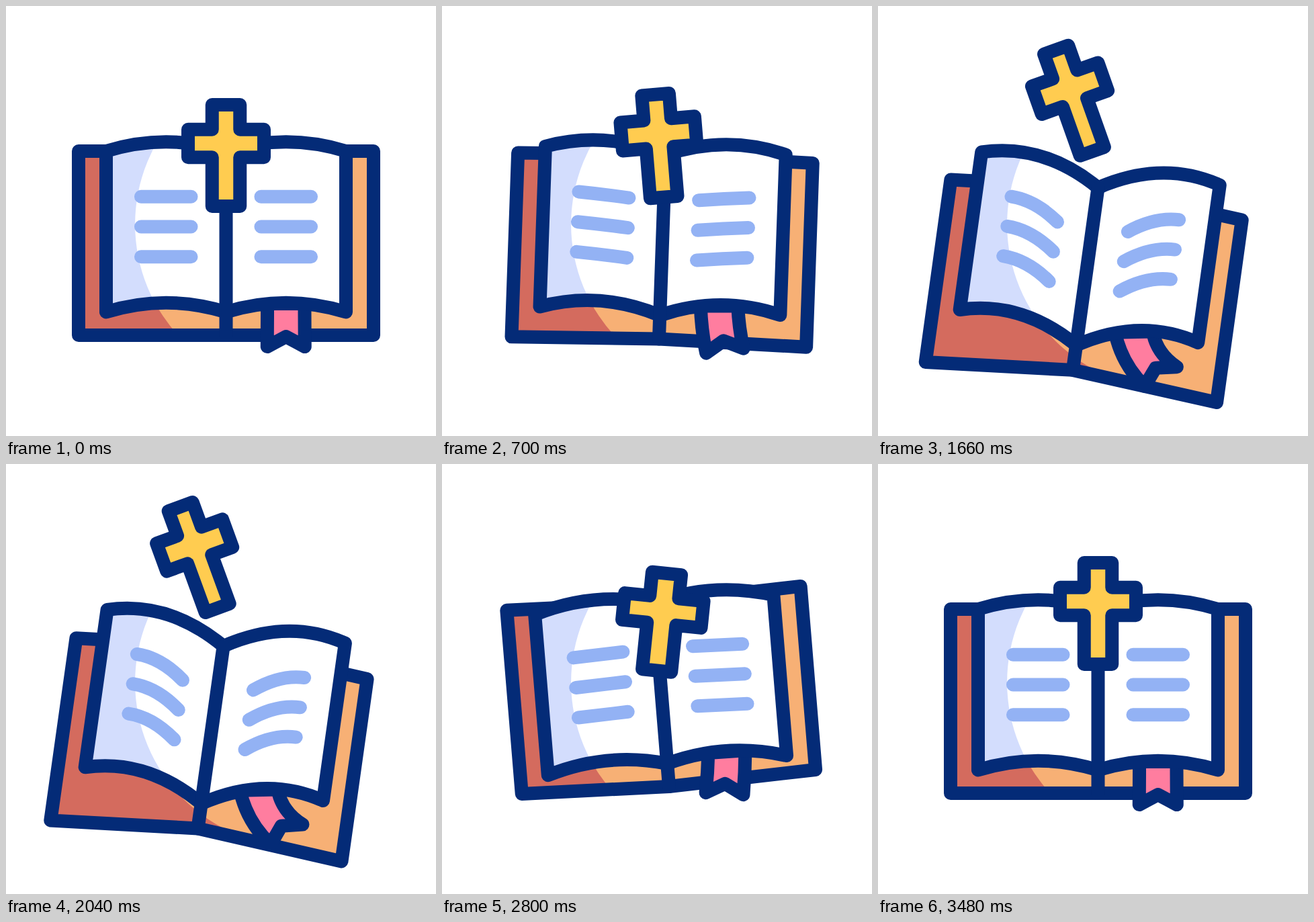
Animation of 640 by 640 pixels, one loop 3.6 s. Source, as an HTML page:

```html
<!DOCTYPE html>
<html lang="en">
<head>
<meta charset="utf-8">
<title>Open book</title>
<style>
html, body { margin: 0; width: 100%; height: 100%; overflow: hidden; background: #fff; }
svg { display: block; width: 100vw; height: 100vh; }
.ink { stroke: #042b77; stroke-width: 20; stroke-linejoin: round; stroke-linecap: round; }
</style>
</head>
<body>
<svg viewBox="0 0 640 640">
  <defs>
    <clipPath id="coverClip"><path class="cover"/></clipPath>
    <clipPath id="pageClip"><path class="pages"/></clipPath>
    <path id="lit" d="M437 80A245 245 0 0 0 437 570V640H700V0H437Z"/>
  </defs>
  <path class="cover" fill="#d46b5e"/>
  <use href="#lit" clip-path="url(#coverClip)" fill="#f7b075"/>
  <path class="cover ink" fill="none"/>
  <path class="ribbon ink" fill="#ff7d9f"/>
  <path class="pages" fill="#d3ddfd"/>
  <use href="#lit" clip-path="url(#pageClip)" fill="#fff"/>
  <path class="text" fill="none" stroke="#93b2f4" stroke-width="20" stroke-linecap="round"/>
  <path class="pages ink" fill="none"/>
  <path class="spine ink" fill="none"/>
  <path class="cross ink" fill="#ffcc50"/>
</svg>
<script>
const LOOP = 3600;
const REST = { x: 327.5, y: 490, tilt: 0, fold: 0, lift: 0 };

// Key moments: foot of the spine, tilt of the book, fold of the pages, lift of the cross.
// Every other measure follows from these.
const keys = [
  { t: 120, ...REST },
  { t: 460, x: 328.5, y: 489, tilt: -.6, fold: -.1, lift: -3 },
  { t: 700, x: 323, y: 495.5, tilt: 2, fold: 2.1, lift: 20 },
  { t: 1120, x: 296.5, y: 539, tilt: 7.4, fold: 7.9, lift: 123 },
  { t: 2040, x: 285.5, y: 542.5, tilt: 8, fold: 9.4, lift: 136 },
  { t: 2200, x: 281, y: 532, tilt: 6, fold: 8.1, lift: 110 },
  { t: 2400, x: 301, y: 509, tilt: 1.5, fold: 4.6, lift: 49.5 },
  { t: 2800, x: 338, y: 480, tilt: -4.7, fold: -.9, lift: -23.5 },
  { t: 3400, ...REST }
];

// Monotone cubic easing: smooth, with no overshoot between keys
const rate = (j, c) => (keys[j + 1][c] - keys[j][c]) / (keys[j + 1].t - keys[j].t);
function slope(j, c) {
  if (j === 0 || j === keys.length - 1) return 0;
  const a = rate(j - 1, c), b = rate(j, c);
  return a * b <= 0 ? 0 : 2 * a * b / (a + b);
}
function poseAt(t) {
  const j = keys.findIndex((k, i) => i && t < k.t) - 1;
  if (t < keys[0].t || j < 0) return REST;
  const p = keys[j], q = keys[j + 1], w = q.t - p.t;
  const u = (t - p.t) / w, u2 = u * u, u3 = u2 * u, pose = {};
  for (const c in REST) {
    pose[c] = p[c] + (q[c] - p[c]) * (3 * u2 - 2 * u3) +
      w * ((u3 - 2 * u2 + u) * slope(j, c) + (u3 - u2) * slope(j + 1, c));
  }
  return pose;
}

const along = deg => [Math.cos(deg * Math.PI / 180), Math.sin(deg * Math.PI / 180)];
const add = (p, q, k = 1) => [p[0] + q[0] * k, p[1] + q[1] * k];
const lerp = (p, q, k) => [p[0] + (q[0] - p[0]) * k, p[1] + (q[1] - p[1]) * k];
const mid = (p, q) => lerp(p, q, .5);
const at = p => p[0].toFixed(2) + ' ' + p[1].toFixed(2);
const M = p => 'M' + at(p), L = p => 'L' + at(p), Q = (c, p) => 'Q' + at(c) + ' ' + at(p);
const set = (name, d) =>
  document.querySelectorAll('.' + name).forEach(e => e.setAttribute('d', d));

function draw(t) {
  const { x, y, tilt, fold, lift } = poseAt(t);
  const foot = [x, y], up = along(tilt - 90), head = add(foot, up, 274);

  // Cover
  const spread = .35 * tilt + .22 * fold;
  const bl = add(foot, along(tilt - spread), -219.5), br = add(foot, along(tilt + spread), 219.5);
  set('cover', M(add(bl, up, 274)) + L(bl) + L(foot) + L(br) + L(add(br, up, 274)) + L(head) + 'Z');
  set('spine', M(head) + L(foot));

  // Pages
  const half = 178.5 + .3 * fold, bow = 27.5 + 1.4 * fold, gap = 34.5 + .3 * fold, tall = 274 - gap;
  const sb = add(foot, up, gap);
  const lb = add(sb, along(tilt + fold), -half), rb = add(sb, along(tilt - fold), half);
  const lt = add(lb, up, tall), rt = add(rb, up, tall);
  const arc = (p, q) => Q(add(mid(p, q), up, bow), q);
  set('pages', M(lb) + L(lt) + arc(lt, head) + arc(head, rt) + L(rb) + arc(rb, sb) + arc(sb, lb) + 'Z');

  // Lines of text, bending with the fold
  let d = '';
  for (const [edge, side] of [[lt, 1], [rt, -1]]) {
    const dir = along(tilt + side * 2.3 * fold), r = 37.3 + .2 * fold;
    for (let i = 0; i < 3; i++) {
      const c = add(mid(edge, head), up, .95 * fold - 67.8 - 44.7 * i);
      d += M(add(c, dir, -r)) + Q(add(c, up, .16 * fold * fold), add(c, dir, r));
    }
  }
  set('text', d);

  // Ribbon, hung from the right page and swaying as the pages fold
  const hang = k => add(add(lerp(sb, rb, k), up, 2 * k * (1 - k) * bow), [-.8 * fold, 0]);
  const a = hang(.345), e = hang(.655);
  const sway = 3.4 * fold, down = along(90 - sway), across = along(-sway);
  const tip = add(mid(a, e), down, 64 + 1.5 * fold);
  const left = add(tip, across, -28), right = add(tip, across, 28), notch = add(tip, down, -15);
  const bend = [-1.35 * fold, .7 * fold];
  set('ribbon', M(a) + Q(add(mid(a, left), bend), left) + L(notch) + L(right) +
    Q(add(mid(right, e), bend), e) + 'Z');

  // Cross, turning against the book and stretching with its tilt
  const centre = [x + 2.45 * tilt - 2.6 * fold, y - 285.5 - lift];
  const turn = -tilt - 1.28 * fold, stretch = .008 * tilt;
  const ax = along(turn), ay = along(turn + 90);
  const w = 20.75, arm = 56.5, top = -57.5, base = 93.5;
  const side = [[w, top], [w, -w], [arm, -w], [arm, w], [w, w], [w, base]];
  const mirror = side.map(([px, py]) => [-px, py]).reverse();
  set('cross', [...side, ...mirror].map(([px, py], i) =>
    (i ? L : M)(add(add(centre, ax, px * (1 - 1.2 * stretch)), ay, py * (1 + stretch)))).join('') + 'Z');
}

function frame(now) {
  draw(now % LOOP);
  requestAnimationFrame(frame);
}
draw(0);
requestAnimationFrame(frame);
</script>
</body>
</html>
```
